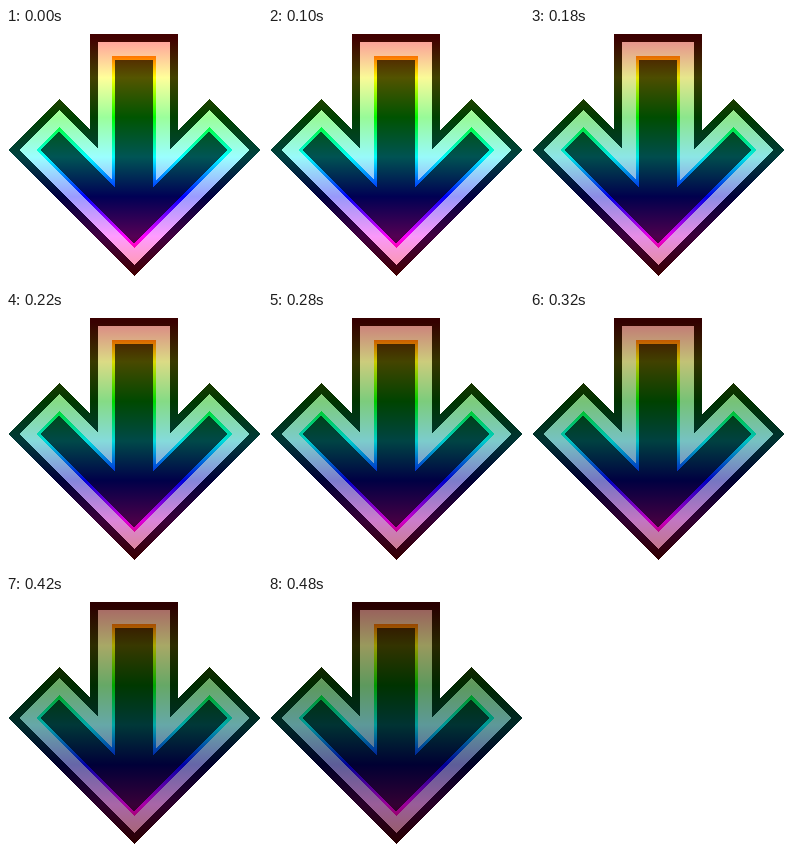
An HTML page for the animation above (0.88 s loop, 256 by 256 pixels).

```html
<!DOCTYPE html>
<html lang="en">
<head>
<meta charset="utf-8">
<title>Rainbow arrow</title>
<style>
html, body { margin: 0; width: 100%; height: 100%; overflow: hidden; background: #fff; }
svg { display: block; width: 100%; height: 100%; }
</style>
</head>
<body>
<svg id="stage" viewBox="0 0 256 256" shape-rendering="crispEdges"></svg>
<script>
const NS = 'http://www.w3.org/2000/svg';
const LOOP = 880, START = 100, STEP = 20, STEPS = 20, FADE = 0.4;
const TOP = 6, BOTTOM = 248, MID = 128, HUE_TOP = 10;
const stage = document.getElementById('stage');

// insets of the stem's sides, its top and the slanted edges,
// then the channel range of the rainbow
const layers = [
  { side: 0, top: 0, slant: 0, low: 0, high: 66 },
  { side: 8, top: 8, slant: 11, low: 155, high: 255 },
  { side: 22, top: 22, slant: 28, low: 0, high: 255 },
  { side: 25, top: 26, slant: 32.5, low: 0, high: 85 }
];
const stops = [];

function add(parent, tag, attrs) {
  const node = document.createElementNS(NS, tag);
  for (const key in attrs) node.setAttribute(key, attrs[key]);
  return parent.appendChild(node);
}

function arrow({ side, top, slant }) {
  const stem = 44 - side;
  const peak = 71 + slant;
  const right = [
    [stem, TOP + top],
    [stem, peak + 75 - stem],
    [75, peak],
    [126 - slant, 122]
  ];
  const left = right.map(([x, y]) => [-x, y]).reverse();
  return [...right, [0, BOTTOM - slant], ...left]
    .map(([x, y]) => (MID + x) + ',' + y).join(' ');
}

// channel strength of a pure hue, 0 to 1
function channel(hue, offset) {
  const k = (hue / 60 + offset) % 6;
  return 1 - Math.max(0, Math.min(k, 4 - k, 1));
}

function build() {
  const defs = add(stage, 'defs', {});
  layers.forEach((layer, i) => {
    const id = 'rainbow' + i;
    const grad = add(defs, 'linearGradient', {
      id, gradientUnits: 'userSpaceOnUse', x1: 0, y1: HUE_TOP, x2: 0, y2: BOTTOM
    });
    for (let hue = 0; hue <= 360; hue += 60) {
      const node = add(grad, 'stop', { offset: hue / 360 });
      const rgb = [5, 3, 1].map(n => layer.low + (layer.high - layer.low) * channel(hue, n));
      stops.push({ node, rgb });
    }
    add(stage, 'polygon', { points: arrow(layer), fill: `url(#${id})` });
  });
}

let shown = -1;
function draw(time) {
  const t = time % LOOP;
  const step = t < START ? 0 : Math.min(STEPS, Math.floor((t - START) / STEP) + 1);
  if (step === shown) return;
  shown = step;
  const light = 1 - FADE * step / STEPS;
  for (const { node, rgb } of stops) {
    node.setAttribute('stop-color', `rgb(${rgb.map(v => Math.round(v * light)).join(',')})`);
  }
}

build();
draw(0);
const begin = performance.now();
function tick() {
  draw(performance.now() - begin);
  requestAnimationFrame(tick);
}
requestAnimationFrame(tick);
</script>
</body>
</html>
```
